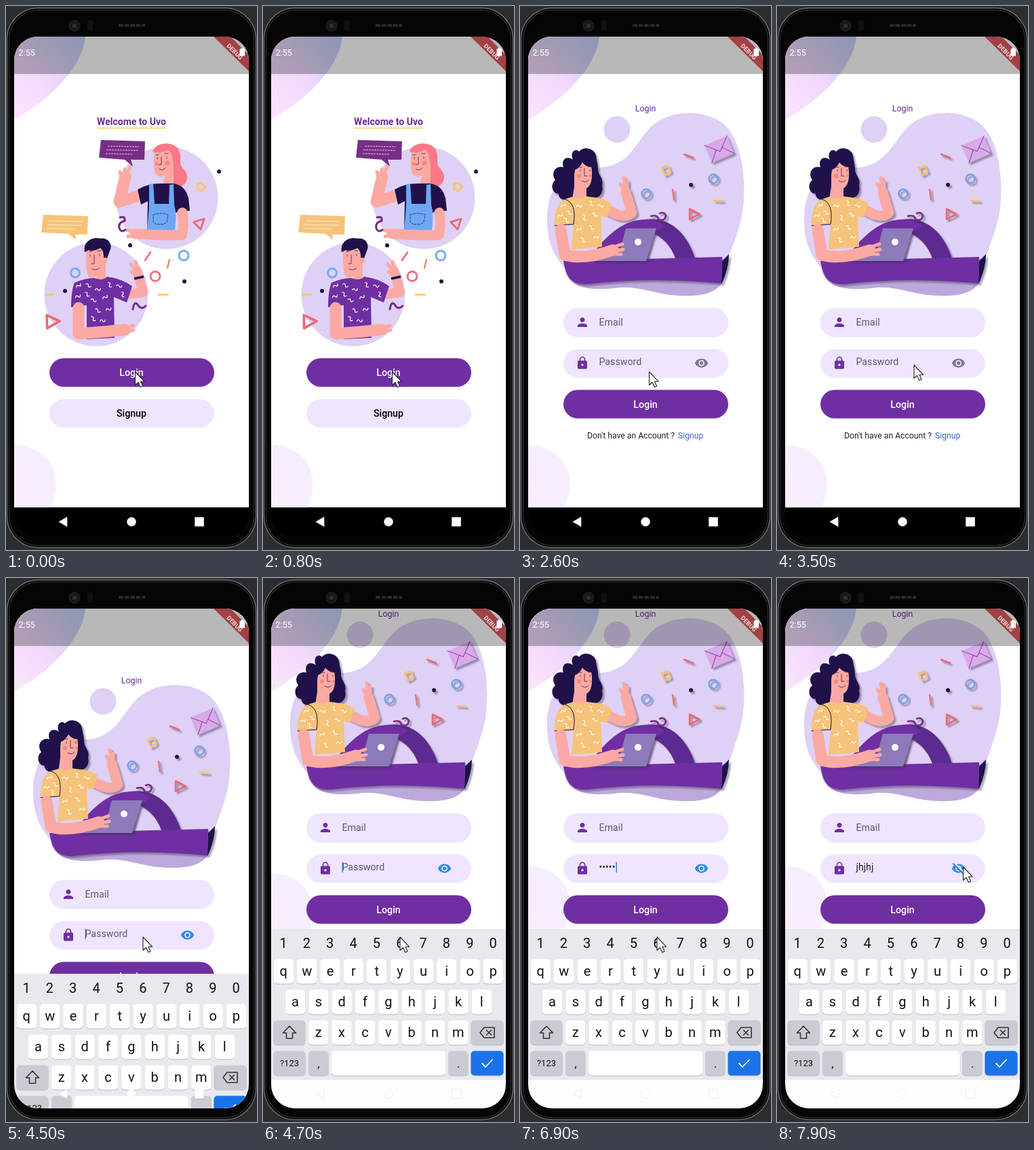
Recreate the animation shown at these times as an HTML page. Size 370 px wide and 800 px high, loop 8000 ms.

```html
<!DOCTYPE html>
<html lang="en">
<head>
<meta charset="utf-8">
<title>Login flow</title>
<style>
  html, body { margin: 0; width: 100%; height: 100%; overflow: hidden; background: #2c2d30; }
  svg { display: block; width: 370px; height: 800px; font-family: Roboto, Arial, sans-serif; }
  .mid { text-anchor: middle; }
  .btn { font-size: 14.2px; font-weight: 500; text-anchor: middle; }
  .field { font-size: 14.2px; fill: #62596e; }
  .line { fill: none; stroke-linecap: round; stroke-linejoin: round; }
  .skin { fill: #fba9a2; }
  .limb { fill: none; stroke: #fba9a2; stroke-linecap: round; stroke-linejoin: round; }
  .navy { fill: #20114a; }
  .purple { fill: #6f2fa3; }
  .light { fill: #efe5fe; }
  .lilac { fill: #dfd0f5; }
  .face { fill: none; stroke: #5c2a55; stroke-width: .9; stroke-linecap: round; }
  .lift { filter: drop-shadow(3px 3px 1px rgba(55, 45, 70, .42)); }
</style>
</head>
<body>
<svg viewBox="0 0 370 800">
  <defs>
    <clipPath id="screen"><rect x="12" y="45" width="346" height="735" rx="35"/></clipPath>
    <linearGradient id="corner" x1="0" y1="1" x2=".9" y2="0">
      <stop offset=".1" stop-color="#fae3fd"/><stop offset=".5" stop-color="#f0d8fb"/><stop offset="1" stop-color="#c3d2fb"/>
    </linearGradient>
    <linearGradient id="foot" x1="0" y1="1" x2="1" y2="0">
      <stop offset="0" stop-color="#faeefd"/><stop offset="1" stop-color="#f3edff"/>
    </linearGradient>
    <g id="backdrop">
      <rect x="12" y="45" width="346" height="692.500" fill="#fff"/>
      <path d="M12 45H117C113 82 84 113 60 134Q36 154 12 167Z" fill="url(#corner)"/>
    </g>
    <path id="swell" d="M12 646C50 645 74 672 73.500 704Q73 724 65 737.500H12Z" fill="url(#foot)"/>
    <path id="squig" class="line" d="M-4 -2q3 -3 4 1t4 0" stroke="#fff" stroke-width="1.200"/>
    <path id="tri" class="line" d="M-8 -5L8 -3L-3 9Z" stroke="#ee6874" stroke-width="2.800"/>
  </defs>

  <rect x="1.500" y="3" width="367" height="793.500" rx="46" fill="#050506" stroke="#68696c" stroke-width="1.500"/>
  <rect x="4.500" y="6" width="361" height="787.500" rx="43" fill="none" stroke="#29292c" stroke-width="1.500"/>
  <circle cx="101" cy="29" r="8" fill="#17181b" stroke="#242529"/>
  <circle cx="101" cy="29" r="3" fill="#303238"/>
  <rect x="120" y="21" width="8" height="16" rx="3" fill="#101113"/>
  <path d="M166 28.500H205" stroke="#2b2b2e" stroke-width="4" stroke-dasharray="7 1.500"/>

  <g clip-path="url(#screen)">
    <g id="welcome">
      <use href="#backdrop"/><use href="#swell"/>
      <path d="M134 179.500H236" stroke="#f3cd58" stroke-width="1.500"/>
      <text class="mid" x="185" y="175" font-size="14" font-weight="700" fill="#6a2a9b">Welcome to Uvo</text>
      <circle class="lilac" cx="237" cy="282" r="75.500"/>
      <circle class="lilac" cx="133" cy="424" r="76.500"/>

      <path d="M140 197L205 199L204 226H184L187 236L175 226L137 223Z" fill="#762e86"/>
      <path d="M150 206L196 207M148 211.500L196 212.500M147 217L186 218" stroke="#d9a9c8" stroke-width="1.200" stroke-dasharray="3 1"/>
      <path d="M55 307L121 309L120 336H102L103 344L92 335L52 333Z" fill="#f7c379"/>
      <path d="M63 316L113 317M61 321.500L112 322.500M60 327L102 328" stroke="#fde6bf" stroke-width="1.200"/>

      <path d="M217 213C221 200 247 198 255 212C260 223 253 231 262 240C271 249 267 263 256 266Q246 263 240 253Z" fill="#fb7886"/>
      <path class="limb" d="M205 276L167 288L176 251" stroke-width="17"/>
      <path class="limb" d="M174 252L175 240M178 249L183 236M170 251L168 244" stroke-width="5"/>
      <path class="skin" d="M219 212Q216 240 221 248Q227 254 234 249L231 266H247L247 222Q242 206 231 207Z"/>
      <path d="M216 214C220 201 247 197 255 213L250 231L246 231Q246 217 239 211Q228 218 216 214Z" fill="#fb7886"/>
      <path class="face" d="M229 222V233H225M223 223V225M237 222V224M226 240Q231 243 235 238M221 219H225M234 217H239"/>
      <circle cx="238" cy="231" r="3.500" fill="#f7857f"/><circle cx="222" cy="232" r="2.500" fill="#f7857f"/>
      <path class="navy" d="M194 270Q208 261 229 261L246 261Q264 263 269 282L271 301L248 304L247 331L208 329L209 287L199 292Z"/>
      <path d="M211 262L217 261L219 291H240L241 263L247 262L248 292Q253 310 248 333L207 331Q210 314 211 291Z" fill="#6ea7f2"/>
      <path class="line" d="M217 307Q228 303 239 307L237 318L232 321H221L217 317Z" stroke="#244581" stroke-width="1" stroke-dasharray="3 2"/>
      <path class="limb" d="M260 304Q263 324 259 337L231 337L190 335" stroke-width="15"/>
      <path class="limb" d="M195 332L179 330M193 337L180 339" stroke-width="5"/>

      <path class="limb" d="M157 410L180 424L202 421L193 389" stroke-width="14"/>
      <path class="limb" d="M194 391L184 380M195 389L191 376M189 393L185 391" stroke-width="5"/>
      <path d="M189 401L203 398" stroke="#20114a" stroke-width="3.500"/>
      <path class="skin" d="M118 360Q117 391 122 398Q128 402 134 397L132 411L147 407L147 370L143 355H122Z"/>
      <path class="navy" d="M116 362C113 346 128 339 139 342C151 340 158 351 153 360L148 374L144 373Q145 360 139 356Q127 362 122 359Z"/>
      <circle class="skin" cx="146" cy="374" r="4"/>
      <path class="face" d="M130 366V379H126M124 366V368M138 365V367M127 387Q133 390 138 385M123 361H127M135 360H140"/>
      <path class="purple" d="M101 407Q117 400 130 400Q143 405 149 398Q171 401 186 412L178 436L159 428L160 488L119 490L119 440L96 443Q96 418 101 407Z"/>
      <path class="limb" d="M107 444L107 482L145 479L175 476" stroke-width="17"/>
      <path class="limb" d="M170 475L188 470M173 478L188 477" stroke-width="5"/>
      <g id="shirtA"></g>

      <g class="navy"><circle cx="314" cy="243.500" r="3"/><circle cx="183" cy="352" r="3"/><circle cx="263" cy="405" r="3"/><circle cx="87" cy="419" r="3"/></g>
      <g class="line" stroke-width="3">
        <g stroke="#79a9f4"><circle cx="262" cy="367" r="7"/><circle cx="102" cy="392.500" r="6.500"/></g>
        <circle cx="220" cy="397.500" r="7" stroke="#ef7480"/>
        <path d="M282 262L288 260L294 266L288 272L282 270Z" stroke="#f7c56f"/>
        <path d="M205 374L213 362" stroke="#ee6874" stroke-width="2.500"/>
        <path d="M238 385L241 373" stroke="#ef8672" stroke-width="2.500"/>
        <path d="M225 424.500H239M58 424.500H71" stroke="#f5c266" stroke-width="2.500"/>
        <path d="M168 311Q176 308 175 316Q165 318 167 327Q170 334 176 329M187 446Q189 433 194 439Q199 448 206 441" stroke="#762e86"/>
      </g>
      <use href="#tri" transform="translate(286 319) rotate(-24)"/>
      <use href="#tri" transform="translate(68 464) rotate(18) scale(1.3)"/>

      <rect class="purple" x="64" y="518" width="243" height="42" rx="21"/>
      <text class="btn" x="185" y="544" fill="#fff">Login</text>
      <rect class="light" x="64" y="578" width="243" height="42" rx="21"/>
      <text class="btn" x="185" y="604">Signup</text>
    </g>

    <g id="login">
      <use href="#backdrop"/><use href="#swell" id="lowSwell"/>
      <g id="form">
        <text class="mid" x="185" y="155" font-size="12.400" fill="#6a2a9b">Login</text>
        <circle class="lilac" cx="143" cy="181.500" r="19.500"/>
        <path class="lilac" d="M40 318C38 270 62 240 105 238C170 241 170 188 206 168C238 151 279 155 302 175C325 197 332 245 330 282C329 326 309 354 303 391C301 415 278 424 252 426C200 428 180 409 138 415C99 419 70 413 65 385C51 367 41 351 40 318Z"/>
        <path d="M67 388L301 401Q292 425 252 426C200 428 180 409 138 415C99 419 71 413 67 388Z" fill="#bca9dc"/>
        <g class="lift">
          <path d="M183 314C225 308 248 340 258 371H229Q219 344 196 334Z" fill="#5d2a8f"/>
          <path class="purple" d="M112 358C142 321 166 313 190 314Q205 316 213 323L196 336L186 373L112 378Z"/>
          <path class="purple" d="M64 375Q100 371 140 373L298 369L297 408Q190 398 100 409C75 411 68 398 64 375Z"/>
          <path class="navy" d="M298 375L308 365Q308 386 297 409Z"/>
        </g>
        <g class="lift">
          <path class="navy" d="M78 226C73 216 81 208 87 214C93 206 109 208 112 220C113 229 115 232 115 240C115 249 124 254 121 264C124 275 116 284 106 282L78 283C66 288 56 284 57 276C47 276 44 262 52 256C44 244 54 234 64 237C60 226 69 219 78 226Z"/>
          <path class="limb" d="M121 296L144 307Q158 311 165 304L156 274" stroke-width="15"/>
          <path class="limb" d="M155 273L148 262M156 271L153 253M158 271L158 258" stroke-width="5"/>
        </g>
        <path class="skin" d="M80 240Q84 224 96 227Q106 230 106 243Q107 264 98 268L98 285H77L80 265Z"/>
        <path class="navy" d="M77 240Q80 221 95 221Q106 223 109 237Q98 238 92 230Q88 238 81 241L79 255L73 253Z"/>
        <path class="face" d="M95 239V250H99M89 241V243M103 241V243M91 257Q97 261 101 256M87 237H91M100 236H104"/>
        <circle cx="87" cy="250" r="3" fill="#f7857f"/><circle cx="104" cy="250" r="2" fill="#f7857f"/>
        <path d="M66 284L79 280Q88 286 98 280L121 283L135 290L128 311L119 309L121 354L76 358L79 321L51 323Q50 292 66 284Z" fill="#f6c37a"/>
        <path class="line" d="M66 284Q84 289 79 321L51 323" stroke="#20114a" stroke-width="1"/>
        <g id="shirtB"></g>
        <g class="lift"><path d="M156 327H201L186 375H105Q128 365 145 368Z" fill="#8d7abb"/></g>
        <circle cx="174" cy="347" r="5" fill="#fff"/>
        <path class="limb" d="M60 329Q63 347 66 366Q94 374 137 359" stroke-width="17"/>
        <path class="limb" d="M134 356L151 350M135 361L152 358M139 365L149 365" stroke-width="5"/>
        <g class="lift">
          <g transform="translate(294 211) rotate(-23)">
            <rect x="-18" y="-14" width="36" height="28" fill="#d9a9ea"/>
            <path class="line" d="M-18 -14L0 3L18 -14M-18 14L-5 -1M18 14L5 -1" stroke="#7b4496" stroke-width="1"/>
          </g>
          <g class="line" stroke-width="2.600">
            <path d="M242 218L255 223" stroke="#ee6874"/><path d="M225 270L227 285" stroke="#ef7480"/>
            <path d="M286 286L299 287" stroke="#f5c266"/>
            <path d="M209 238L218 235L222 244L214 249Z" stroke="#f5c266"/>
            <g stroke="#6fa4ef"><circle cx="186" cy="276" r="6.500"/><circle cx="285" cy="254" r="6.500"/></g>
            <path d="M193 309Q203 306 204 314Q214 317 215 308Q212 302 206 305" stroke="#762e86"/>
          </g>
          <circle class="navy" cx="252" cy="263" r="3"/>
          <use href="#tri" transform="translate(256 306) rotate(20)"/>
        </g>

        <rect class="light" x="64" y="444" width="243" height="43" rx="21"/>
        <rect class="light" x="64" y="504.500" width="243" height="42" rx="21"/>
        <path class="purple" transform="translate(81.400 454.500) scale(.88)" d="M12 12c2.210 0 4-1.790 4-4s-1.790-4-4-4-4 1.790-4 4 1.790 4 4 4zm0 2c-2.670 0-8 1.340-8 4v2h16v-2c0-2.660-5.330-4-8-4z"/>
        <path class="purple" transform="translate(81.400 514.500) scale(.88)" d="M18 8h-1V6a5 5 0 0 0-10 0v2H6a2 2 0 0 0-2 2v10a2 2 0 0 0 2 2h12a2 2 0 0 0 2-2V10a2 2 0 0 0-2-2zm-6 9a2 2 0 1 1 0-4 2 2 0 0 1 0 4zm3.100-9H8.900V6a3.100 3.100 0 0 1 6.200 0z"/>
        <text class="field" x="116.500" y="470">Email</text>
        <text class="field" id="pass" x="116.500" y="528"></text>
        <rect id="caret" y="516" width="1.500" height="15" fill="#2a84e0"/>
        <g id="eye" transform="translate(257 514.500) scale(.88)">
          <path d="M12 4.500C7 4.500 2.730 7.610 1 12c1.730 4.390 6 7.500 11 7.500s9.270-3.110 11-7.500c-1.730-4.390-6-7.500-11-7.500zM12 17a5 5 0 1 1 0-10 5 5 0 0 1 0 10zm0-8a3 3 0 1 0 0 6 3 3 0 0 0 0-6z"/>
          <g id="slash"><path d="M4 2L22 20" stroke="#efe5fe" stroke-width="2.500"/><path d="M2.500 3.500L20.500 21.500" stroke="#2b73c8" stroke-width="2"/></g>
        </g>
        <rect class="purple" x="64" y="564.500" width="243" height="42" rx="21"/>
        <text class="btn" x="185" y="590.500" fill="#fff">Login</text>
        <text x="99" y="636" font-size="12.200" fill="#222">Don't have an Account ?</text>
        <text x="233" y="636" font-size="12.200" fill="#3a66c4">Signup</text>
      </g>
    </g>

    <rect x="12" y="45" width="346" height="55" fill="#000" fill-opacity=".28"/>
    <text x="18.500" y="72.500" font-size="12.600" fill="#fff">2:55</text>
    <path d="M306 45H331L359 73V97Z" fill="#a0353a" fill-opacity=".9"/>
    <text class="mid" transform="translate(335 69.500) rotate(45)" font-size="9" font-weight="700" fill="#f3dcdc">DEBUG</text>
    <path d="M346.500 61.500H350V63H352V73.500H344.500V63H346.500Z" fill="#fff"/>

    <rect x="12" y="737.500" width="346" height="43"/>
    <g id="keys"></g>
    <g fill="#fff" stroke="#e9e9e9" stroke-width=".7">
      <path d="M78 758.500L90 751.500V765.500Z"/><circle cx="185" cy="758.500" r="6.500"/><rect x="278.500" y="752" width="13" height="13"/>
    </g>
  </g>
  <path id="mouse" d="M0 0V19.500L4.500 15.500L7.800 22.500L11 21L8 14.200H13.500Z" fill="#fff" stroke="#222" stroke-width="1.100" stroke-linejoin="round"/>
</svg>
<script>
  const $ = id => document.getElementById(id);
  const clamp = x => Math.min(1, Math.max(0, x));
  const easeOut = x => 1 - (1 - clamp(x)) ** 3;
  const LOOP = 8000, KEYS_H = 264, INSET = 222, PITCH = 34.35;

  const scatter = (id, points) => $(id).innerHTML = points.map(([x, y], i) =>
    `<use href="#squig" transform="translate(${x} ${y}) rotate(${i * 67 % 120 - 50})"/>`).join('');
  scatter('shirtA', [[108, 412], [121, 412], [107, 428], [119, 425], [136, 418], [152, 411], [167, 413],
    [171, 425], [129, 434], [147, 429], [135, 449], [152, 447], [128, 461], [143, 464]]);
  scatter('shirtB', [[65, 294], [72, 305], [60, 309], [68, 316], [88, 295], [104, 291], [119, 295],
    [94, 312], [110, 308], [88, 329], [105, 327], [113, 341], [92, 345]]);

  // Keyboard at its resting place
  const label = (x, y, s, size = 20) =>
    `<text class="mid" x="${x}" y="${y}" font-size="${size}" fill="#111">${s}</text>`;
  const cap = (x, y, w, fill) =>
    `<rect x="${x}" y="${y + 1}" width="${w}" height="36" rx="5" fill="#b9bbc1"/>` +
    `<rect x="${x}" y="${y}" width="${w}" height="36" rx="5" fill="${fill}"/>`;
  const row = (chars, x0, y) => [...chars].map((c, i) => {
    const x = x0 + i * PITCH;
    return cap(x - 14.7, y, 29.4, '#fff') + label(x, y + 24, c);
  }).join('');
  const grey = '#cbccd3', icon = 'class="line" stroke="#333" stroke-width="1.6"';
  $('keys').innerHTML =
    '<path d="M12 516H358V738H12Z" fill="#e8e9ee"/><path d="M12 738H358V780H12Z" fill="#fdfdfe"/>' +
    [...'1234567890'].map((c, i) => label(30 + i * PITCH, 544, c)).join('') +
    row('qwertyuiop', 30.3, 560.5) + row('asdfghjkl', 47.5, 605.5) + row('zxcvbnm', 81.7, 650.5) +
    cap(15.5, 650.5, 47, grey) + cap(306.5, 650.5, 48, grey) +
    cap(15.5, 695.5, 47, grey) + cap(67, 695.5, 30, grey) + cap(101, 695.5, 168, '#fff') +
    cap(273, 695.5, 29.5, grey) + cap(306.5, 695.5, 48, '#1a73e8') +
    label(39, 718, '?123', 13) + label(82, 720, ',', 17) + label(288, 720, '.', 17) +
    `<path ${icon} d="M39 659L48.500 669H43.500V677H34.500V669H29.500Z"/>` +
    `<path ${icon} d="M326 661H341V676H326L320 668.500ZM329.500 665L336.500 672M336.500 665L329.500 672"/>` +
    '<path class="line" d="M323 714L328 719L338 708.500" stroke="#fff" stroke-width="1.800"/>';

  function password(t) {
    if (t < 6200) return 'Password';
    if (t >= 7700) return 'jhjhj';
    const count = t < 6600 ? 1 : Math.min(5, 2 + Math.floor((t - 6600) / 100));
    return '•'.repeat(count);
  }

  function draw(t) {
    // Page change
    const p = easeOut((t - 2280) / 300), s = .85 + .15 * p;
    $('login').setAttribute('opacity', p);
    $('login').setAttribute('transform', `translate(${185 * (1 - s)} ${391 * (1 - s)}) scale(${s})`);

    // Keyboard, with the page following slightly later
    const up = easeOut((t - 4390) / 300), inset = INSET * easeOut((t - 4510) / 300);
    $('keys').setAttribute('transform', `translate(0 ${KEYS_H * (1 - up)})`);
    $('form').setAttribute('transform', `translate(0 ${-Math.min(98, inset / 2)})`);
    $('lowSwell').setAttribute('transform', `translate(0 ${-inset})`);

    // Password field
    const typed = t >= 6200, pass = $('pass');
    pass.textContent = password(t);
    pass.style.fill = typed ? '#222' : '';
    const caretOn = (t >= 4400 && t < 4900) || (t >= 5200 && t < 5800) || (t >= 6000 && t < 7300);
    $('caret').setAttribute('opacity', +caretOn);
    $('caret').setAttribute('x', 116.5 + (typed ? pass.getComputedTextLength() + 1 : 0));
    $('eye').setAttribute('fill', t < 4400 ? '#83768f' : '#2a8cee');
    $('slash').setAttribute('opacity', +(t >= 7700));

    // Pointer
    const m = clamp((t - 6950) / 350), go = m * m * (3 - 2 * m);
    const [x, y] = t < 3500 ? [190.5, 538] : [202 + 72.5 * go, 528 - 103 * go];
    $('mouse').setAttribute('transform', `translate(${x} ${y})`);
  }

  const start = performance.now();
  function tick() {
    draw((performance.now() - start) % LOOP);
    requestAnimationFrame(tick);
  }
  tick();
</script>
</body>
</html>
```
